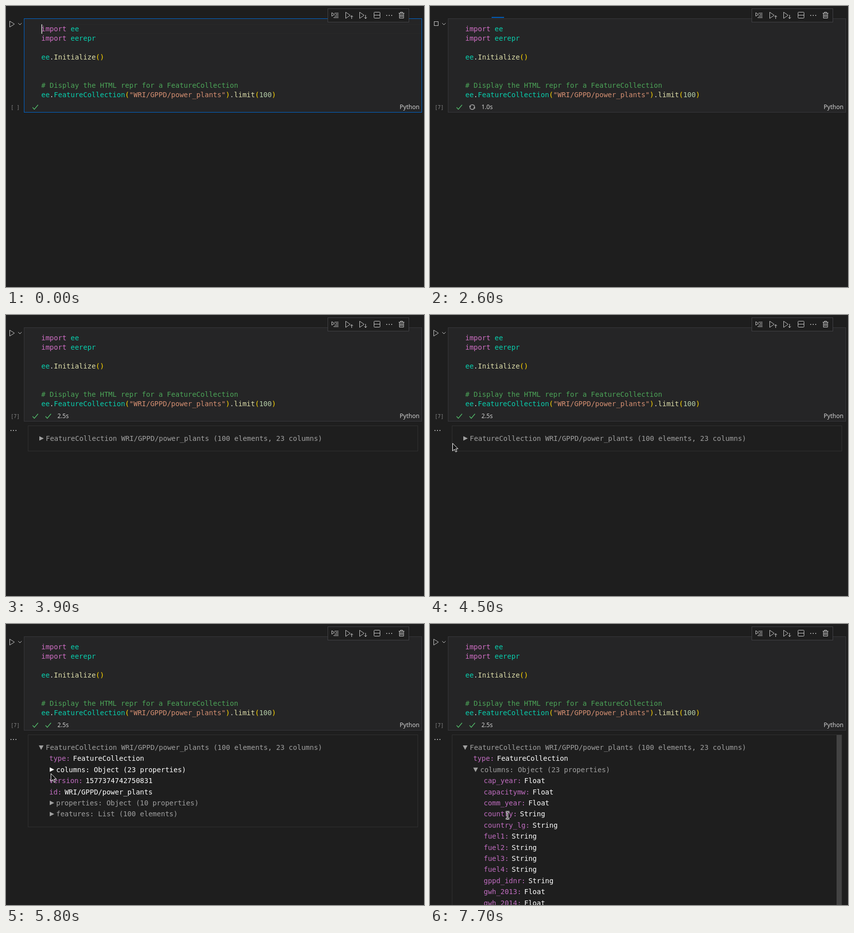
Write an HTML page that moves like this. It is 841 px wide and 567 px high and loops after 8000 ms.

```html
<!DOCTYPE html>
<html lang="en">
<head>
<meta charset="utf-8">
<title>Notebook cell</title>
<style>
html, body { margin: 0; width: 100%; height: 100%; overflow: hidden; background: #1e1e1e; }
body { position: relative; }
svg { position: absolute; left: 0; top: 0; }
pre, .panel { font: 14px/19px "DejaVu Sans Mono", monospace; }
pre { position: absolute; left: 71px; top: 37px; margin: 0; color: #d4d4d4; }
.kw { color: #d16fc6; } .ty { color: #08cfae; } .fn { color: #dfdfab; }
.br { color: #ffd700; } .co { color: #4ca558; } .st { color: #d69072; } .nu { color: #b5cea8; }
.ui { font: 12px "Noto Sans", sans-serif; fill: #d0d0d0; }
.count { font: 10px "DejaVu Sans Mono", monospace; fill: #858585; }
.ico { fill: none; stroke: #c8c8c8; }
.dots { fill: #c8c8c8; }
.ok { fill: none; stroke: #54bf6c; stroke-width: 1.3; }

/* every track shares one 8 s clock */
.t, .panel, .sum, .sum::before { animation: 8s step-end -20ms infinite; }
.focus { animation-name: focus; } .ran { animation-name: ran; }
.run { animation-name: run; } .idle { animation-name: idle; } .done { animation-name: done; }
.caret { animation-name: caret; } .bar { animation-name: bar; }
.spin { animation-name: run, spin; }
@keyframes focus { 0% { visibility: visible } 21.25%, to { visibility: hidden } }
@keyframes ran { 0% { visibility: hidden } 21.25%, to { visibility: visible } }
@keyframes run { 0%, 45%, to { visibility: hidden } 21.25% { visibility: visible } }
@keyframes idle { 0%, 45%, to { visibility: visible } 21.25% { visibility: hidden } }
@keyframes done { 0% { visibility: hidden } 45%, to { visibility: visible } }
@keyframes caret { 0%, 12.5% { visibility: visible } 6.25%, 18.75%, to { visibility: hidden } }
@keyframes bar {
  0% { x: 0; width: 17px; opacity: 0 }
  21.25% { x: 0; width: 17px; opacity: 0; animation-timing-function: steps(7) }
  22.5% { x: 15px; width: 18px; opacity: 1; animation-timing-function: steps(6) }
  30% { x: 108px; width: 24px; opacity: 1 }
  32.5% { x: 124px; width: 25px; opacity: 1; animation-timing-function: steps(8) }
  42.5% { x: 248px; width: 34px; opacity: 1 }
  43.75% { x: 263px; width: 35px; opacity: 1 }
  45%, to { x: 0; width: 17px; opacity: 0 }
}
@keyframes spin {
  0%, 21.25% { transform: rotate(0); animation-timing-function: steps(7) }
  30% { transform: rotate(164deg) }
  32.5% { transform: rotate(188deg); animation-timing-function: steps(8) }
  42.5% { transform: rotate(375deg) }
  43.75%, to { transform: rotate(398deg) }
}

.panel {
  position: absolute; left: 44px; top: 223px; width: 785px; box-sizing: border-box;
  border: 1px solid #303031; overflow: hidden; line-height: 22.4px; white-space: pre;
  color: #fff; animation-name: done, grow;
}
@keyframes grow {
  0% { height: 52px }
  66.25% { height: 187px; border-bottom-color: #303031 }
  85% { height: 195px; border-bottom-color: #1e1e1e }
  86.25%, to { height: 400px; border-bottom-color: #1e1e1e }
}
.thumb { position: absolute; right: 0; top: 0; width: 10px; height: 400px; background: #434343; }
.row { position: absolute; left: calc(21px + 21px * var(--in)); top: calc(14px + 22.4px * var(--n)); }
.row b { font-weight: 400; color: #c06cc0; margin-right: .4em; }
.sum { padding-left: 14px; color: #a0a0a0; }
.sum::before {
  content: ""; position: absolute; left: 0; top: 6px; width: 10px; height: 10px;
  background: currentColor; clip-path: polygon(10% 5%, 100% 50%, 10% 95%);
}
.root { animation-name: hover-root; } .root::before { animation-name: open-root; }
.cols { animation-name: from-open, hover-cols; } .cols::before { animation-name: open-cols; }
.type { animation-name: from-click; }
.rest { animation-name: rest; } .fields { animation-name: fields; }
.sum.t:not(.root):not(.cols) { animation-name: rest; }
@keyframes hover-root { 58.75% { color: #fff } 0%, 67.5%, to { color: #a0a0a0 } }
@keyframes hover-cols { 72.5% { color: #fff } 0%, 90%, to { color: #a0a0a0 } }
@keyframes open-root { 66.25%, to { clip-path: polygon(0 10%, 95% 10%, 47% 100%) } }
@keyframes open-cols { 87.5%, to { clip-path: polygon(0 10%, 95% 10%, 47% 100%) } }
@keyframes from-click { 0% { visibility: hidden } 65%, to { visibility: visible } }
@keyframes from-open { 0% { visibility: hidden } 66.25%, to { visibility: visible } }
@keyframes rest { 0%, 85%, to { visibility: hidden } 66.25% { visibility: visible } }
@keyframes fields { 0% { visibility: hidden } 85%, to { visibility: visible } }

.mouse { animation-name: move; }
.arrow { animation-name: arrow; } .hand { animation-name: hand; } .beam { animation-name: beam; }
@keyframes move {
  0% { transform: translate(45px, 258px) }
  56.25% { transform: translate(45px, 258px); animation-timing-function: steps(3) }
  60% { transform: translate(70px, 251px) }
  66.25% { transform: translate(70px, 251px); animation-timing-function: steps(2) }
  68.75% { transform: translate(81px, 309px) }
  72.5% { transform: translate(90px, 301px); animation-timing-function: steps(6) }
  80% { transform: translate(128px, 297px) }
  88.75% { transform: translate(128px, 297px); animation-timing-function: steps(4) }
  93.75% { transform: translate(152px, 403px) }
  96.25%, to { transform: translate(156px, 386px) }
}
@keyframes arrow { 0%, 60%, 73.75%, to { visibility: hidden } 56.25%, 67.5% { visibility: visible } }
@keyframes hand { 0%, 67.5%, 91.25%, to { visibility: hidden } 60%, 73.75% { visibility: visible } }
@keyframes beam { 0% { visibility: hidden } 91.25%, to { visibility: visible } }
</style>
</head>
<body>
<svg width="841" height="567">
  <rect class="t bar" y="22" height="2" fill="#0060c0"/>
  <rect x="36.5" y="25.5" width="800" height="189" fill="#252526" stroke="#37373b"/>
  <g class="t focus">
    <rect x="36.5" y="25.5" width="800" height="189" fill="none" stroke="#0066cc"/>
    <path d="M71 37.5H836M71 55.5H836" stroke="#292929"/>
    <text class="count" x="9.5" y="208" xml:space="preserve">[ ]</text>
  </g>
  <text class="t ran count" x="9.5" y="208">[7]</text>

  <path class="ico t idle" d="M7.5 30.5V42.5L17 36.5Z"/>
  <rect class="ico t run" x="8.5" y="31.5" width="8" height="8"/>
  <path class="ico" d="M24.5 34.5L28 38L31.5 34.5"/>

  <path class="ok" d="M53.5 204.5L57 208.5L64.5 199.5"/>
  <path class="ok t done" d="M79.5 204.5L83 208.5L90.5 199.5"/>
  <g transform="translate(85 204)">
    <g class="t spin">
      <path class="ico" d="M-4.6 -1.4A4.8 4.8 0 0 1 4.7 -.6M4.6 1.4A4.8 4.8 0 0 1 -4.7 .6" stroke-width="1.2"/>
      <path class="dots" d="M-6.6 -1.6H-2.4L-4.4 1.2ZM6.6 1.6H2.4L4.4 -1.2Z"/>
    </g>
  </g>
  <text class="ui" id="timer" x="103.5" y="208"></text>
  <text class="ui" x="792" y="208">Python</text>
  <g class="dots t done"><circle cx="10" cy="233" r="1.1"/><circle cx="15" cy="233" r="1.1"/><circle cx="20" cy="233" r="1.1"/></g>

  <rect x="647.5" y="5.5" width="163" height="27" fill="#1e1e1e" stroke="#424245"/>
  <g class="ico">
    <path d="M655.5 13.5V20.5L661 17ZM661 14.5H669M663 17.5H669M661 20.5H669M659 23.5H669"/>
    <path d="M683.5 12.5V25L692.5 18.7ZM695.5 26V19.5M692.8 22L695.5 19.3L698.2 22"/>
    <path d="M711.5 12.5V25L720.5 18.7ZM723.5 18V25.5M720.8 22.8L723.5 25.5L726.2 22.8"/>
    <path d="M740.5 18.5H752.5"/><rect x="740.5" y="12.5" width="12" height="12" rx="1"/>
    <path d="M790 14.5H801.5M793.5 14.5V12.5H798V14.5M791.5 14.5V24.5H800V14.5M793.5 16.5V22.5M795.7 16.5V22.5M798 16.5V22.5"/>
  </g>
  <g class="dots"><circle cx="766" cy="19" r="1"/><circle cx="771" cy="19" r="1"/><circle cx="776" cy="19" r="1"/></g>
</svg>

<pre><i></i><span class="kw">import</span> <span class="ty">ee</span>
<span class="kw">import</span> <span class="ty">eerepr</span>

<span class="ty">ee</span>.<span class="fn">Initialize</span><span class="br">()</span>


<span class="co"># Display the HTML repr for a FeatureCollection</span>
<span class="ty">ee</span>.<span class="ty">FeatureCollection</span><span class="br">(</span><span class="st">"WRI/GPPD/power_plants"</span><span class="br">)</span>.<span class="fn">limit</span><span class="br">(</span><span class="nu">100</span><span class="br">)</span></pre>

<div class="panel" id="panel"><div class="thumb t fields"></div></div>

<svg width="841" height="567">
  <rect class="t caret" x="71" y="37" width="2" height="19" fill="#aeafad"/>
  <g class="t mouse" stroke="#fff">
    <path class="t arrow" d="M.5 .8V16.2L4.2 12.9L6.7 18.3L9.1 17.2L6.7 12H11.4Z" fill="#111"/>
    <path class="t hand" fill="#222" stroke-linejoin="round" d="M-1.5 12V1.5Q0 -.5 1.5 1.5V7L10 8.5Q11.5 9 11.5 11V14L9.5 18.5H1L-4.3 11.5Q-4 9 -1.5 12Z"/>
    <g class="t beam" fill="none">
      <path d="M-3.5 -7H-1L0 -6L1 -7H3.5M-3.5 7H-1L0 6L1 7H3.5M0 -6V6" stroke-width="3"/>
      <path d="M-3 -7H-1L0 -6L1 -7H3M-3 7H-1L0 6L1 7H3M0 -6V6" stroke="#111"/>
    </g>
  </g>
</svg>

<script>
const panel = document.getElementById('panel');
const timer = document.getElementById('timer');

function row(n, indent, cls, text) {
  const el = document.createElement('div');
  el.className = `row t ${cls}`;
  el.style.cssText = `--n:${n};--in:${indent}`;
  el.innerHTML = text;
  panel.append(el);
}
const pair = (n, indent, cls, key, value) => row(n, indent, cls, `<b>${key}:</b>${value}`);

row(0, 0, 'sum root', 'FeatureCollection WRI/GPPD/power_plants (100 elements, 23 columns)');
pair(1, 1, 'type', 'type', 'FeatureCollection');
row(2, 1, 'sum cols', 'columns: Object (23 properties)');
pair(3, 1, 'rest', 'version', '1577374742750831');
pair(4, 1, 'rest', 'id', 'WRI/GPPD/power_plants');
row(5, 1, 'sum', 'properties: Object (10 properties)');
row(6, 1, 'sum', 'features: List (100 elements)');

const floats = ['cap_year', 'capacitymw', 'comm_year', 'gwh_2013', 'gwh_2014'];
['cap_year', 'capacitymw', 'comm_year', 'country', 'country_lg', 'fuel1', 'fuel2', 'fuel3',
  'fuel4', 'gppd_idnr', 'gwh_2013', 'gwh_2014'].forEach((key, i) =>
  pair(i + 3, 2, 'fields', key, floats.includes(key) ? 'Float' : 'String'));

// The elapsed time follows the clock of the CSS tracks; it pauses for one tick at 2.5 s.
const clock = document.querySelector('.mouse').getAnimations()[0];
function tick() {
  const t = (clock.currentTime + 20) % 8000;
  const ticks = Math.floor((t - (t < 2500 ? 1700 : 1800)) / 100);
  const label = t < 1700 ? '' : (t < 3600 ? 0.4 + 0.075 * ticks : 2.5).toFixed(1) + 's';
  if (timer.textContent !== label) timer.textContent = label;
  requestAnimationFrame(tick);
}
tick();
</script>
</body>
</html>
```
